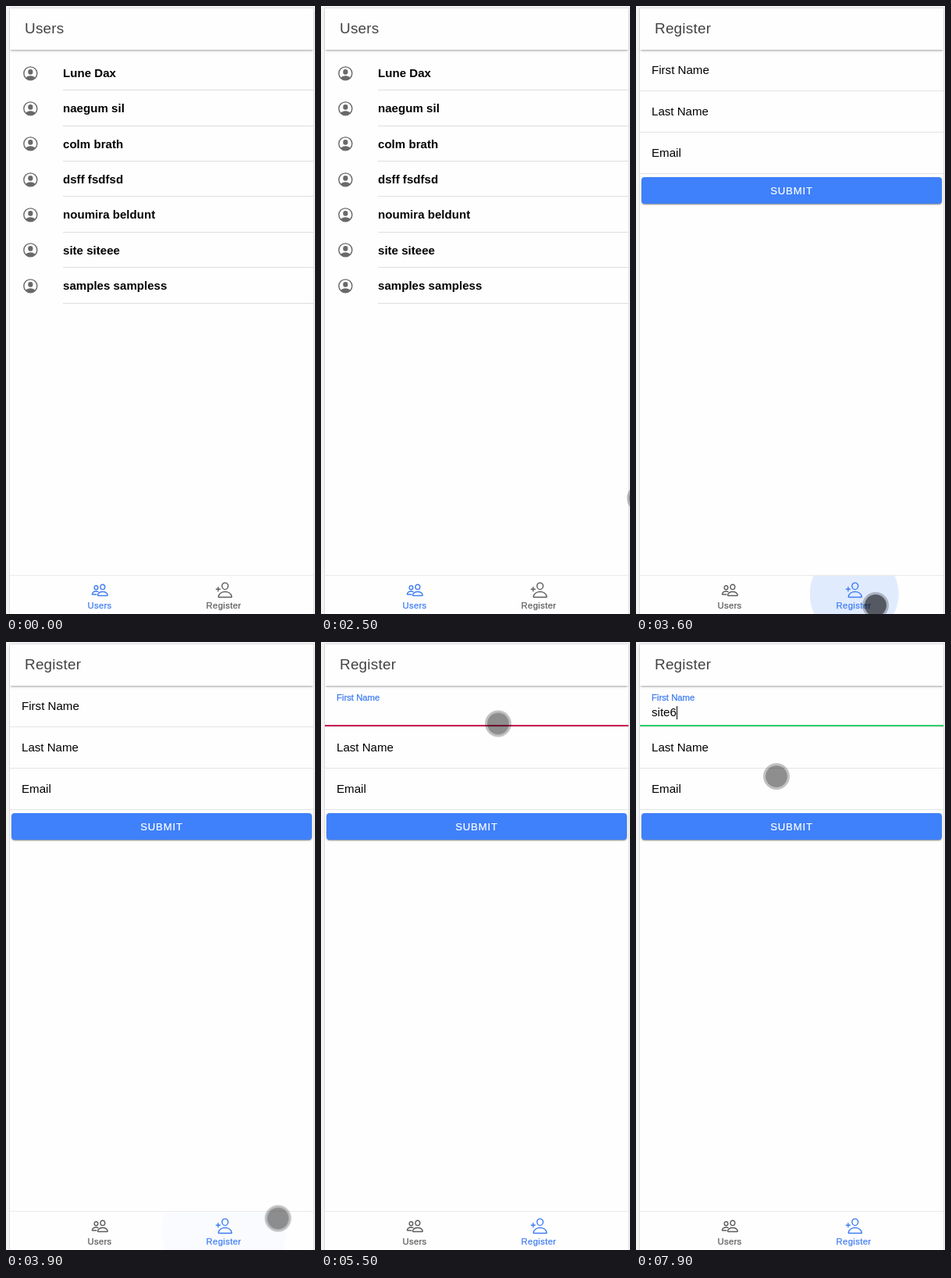
These frames come from a looping animation (396 by 778 pixels, 8000 ms). An HTML page:

```html
<!DOCTYPE html>
<html lang="en">
<head>
<meta charset="utf-8">
<title>Users and Register tabs</title>
<style>
  html, body { margin: 0; width: 100%; height: 100%; overflow: hidden; }
  body {
    --blue: #3f7df2;
    --grey: #5c5c5c;
    position: relative;
    background: #f3f3f3;
    font: 15.1px/20px "Liberation Sans", Arial, sans-serif;
    color: #000;
  }
  body * { box-sizing: border-box; }
  .phone, .page, .mover { position: absolute; }
  .phone {
    left: 0; top: 0; width: 396px; height: 778px; overflow: hidden;
  }
  .screen {
    position: absolute; left: 4px; top: 2px; width: 391px; height: 780px;
    background: #fefefe; border: 1px solid #dedede;
  }
  .page { inset: 0; }
  .header {
    position: absolute; left: 5px; top: 3px; width: 389px; height: 52.5px;
    padding-left: 19px; line-height: 51.5px;
    font-size: 18.9px; letter-spacing: .0125em; color: #424242;
    background: #fefefe;
    box-shadow: 0 2px 2px -1px rgba(0,0,0,.26), 0 3px 3px -1px rgba(0,0,0,.1);
  }
  svg { fill: none; stroke: currentColor; stroke-width: 32; stroke-linecap: round; stroke-linejoin: round; }

  .users { position: absolute; left: 5px; top: 63px; width: 389px; margin: 0; padding: 0; list-style: none; }
  .users li { height: 45.36px; position: relative; font-weight: bold; line-height: 45px; padding-left: 68px; }
  .users li::after { content: ""; position: absolute; left: 68px; right: 0; bottom: 0; height: 1px; background: #dedede; }
  .users svg { position: absolute; left: 15.2px; top: 11.7px; width: 22.7px; height: 22.7px; color: #696969; }

  .field { position: absolute; left: 5px; width: 389px; height: 53px; border-bottom: 1.5px solid #e4e4e4; }
  .label { position: absolute; left: 15px; top: 16.2px; transform-origin: 0 50%; white-space: nowrap; }
  .line { position: absolute; left: 0; right: 0; top: 50.7px; height: 2px; }
  .value { position: absolute; left: 15px; top: 24.8px; white-space: pre; }
  .caret { display: inline-block; width: 1px; height: 17px; background: #000; vertical-align: -4px; }
  .submit {
    position: absolute; left: 7px; top: 218.5px; width: 385px; height: 34px; border-radius: 4px;
    background: #3f80fb; color: #fff; text-align: center; line-height: 35px;
    font-size: 13.2px; letter-spacing: .06em; -webkit-text-stroke: .2px;
    box-shadow: 0 2px 1px -1px rgba(0,0,0,.2), 0 1px 2px rgba(0,0,0,.24), 0 1px 3px rgba(0,0,0,.12);
  }

  .tabs { position: absolute; left: 5px; top: 728px; width: 389px; height: 50px; border-top: 1px solid #ebebeb; }
  .tab {
    position: absolute; top: 0; width: 159px; height: 49px; overflow: hidden; text-align: center;
    font-size: 11.3px; letter-spacing: .03em; color: var(--grey);
  }
  .tab svg { position: absolute; left: 68.4px; top: 7.2px; width: 22.7px; height: 22.7px; }
  .tab span { position: absolute; left: 0; right: 0; top: 28px; -webkit-text-stroke: .25px; }
  .ripple {
    position: absolute; left: 0; top: -56px; width: 159px; height: 159px; border-radius: 50%;
    background: #3880ff; opacity: 0;
  }
  .pointer {
    position: absolute; left: -17px; top: -17px; width: 34px; height: 34px; border-radius: 50%;
    border: 3px solid rgba(0,0,0,.24); background: rgba(0,0,0,.44); background-clip: padding-box;
  }

  /* One 8 s clock: 1% is 80 ms. */
  .users-page { animation: leave 8s step-end infinite; }
  .form-page { animation: enter 8s step-end infinite; }
  .tab-users { animation: deselect 8s step-end infinite; }
  .tab-register { animation: select 8s step-end infinite; }
  .ripple { animation: ripple 8s linear infinite; }
  .first .label { animation: float 8s linear infinite; }
  .first .line { animation: validity 8s step-end infinite; }
  .mover { left: 0; top: 0; animation: move 8s ease-out infinite; }
  .pointer { animation: press 8s step-end infinite; }

  @keyframes leave { 0% { visibility: visible } 45%, 100% { visibility: hidden } }
  @keyframes enter { 0% { visibility: hidden } 45%, 100% { visibility: visible } }
  @keyframes deselect { 0% { color: var(--blue) } 45%, 100% { color: var(--grey) } }
  @keyframes select { 0% { color: var(--grey) } 45%, 100% { color: var(--blue) } }
  @keyframes ripple {
    0%, 44.1% { transform: scale(.5); opacity: 0 }
    44.11% { transform: scale(.5); opacity: .15; animation-timing-function: cubic-bezier(.4,0,.2,1) }
    46.9%, 47.2% { transform: scale(1); opacity: .15 }
    49.1%, 100% { transform: scale(1); opacity: 0 }
  }
  @keyframes float {
    0%, 66.25% { transform: none; color: #000; -webkit-text-stroke-width: 0 }
    68.1%, 100% { transform: translateY(-10.7px) scale(.75); color: var(--blue); -webkit-text-stroke-width: .35px }
  }
  @keyframes validity {
    0% { background: transparent }
    66.25% { background: #c81e50 }
    73.75%, 100% { background: #2fd06f }
  }
  @keyframes move {
    0%, 31% { transform: translate(416px, 620px) }
    37.5% { transform: translate(307px, 766px) }
    38.75%, 47.5% { transform: translate(307px, 767px) }
    52.5% { transform: translate(416px, 690px) }
    52.6%, 60.6% { transform: translate(416px, 60px) }
    66.25%, 81.25% { transform: translate(227px, 104.5px) }
    82.5%, 91.25% { transform: translate(225px, 121px) }
    98.75%, 100% { transform: translate(180px, 172px) }
  }
  @keyframes press {
    0%, 46.25%, 67.5%, 100% { background-color: rgba(0,0,0,.44) }
    43.75%, 66.25% { background-color: rgba(0,0,0,.62) }
  }
</style>
</head>
<body>
<svg width="0" height="0" style="position:absolute">
  <symbol id="account" viewBox="0 0 512 512">
    <circle cx="256" cy="256" r="192"/>
    <g fill="currentColor" stroke="none">
      <ellipse cx="256" cy="212" rx="70" ry="74"/>
      <path d="M120 382C165 300 347 300 392 382C340 465 172 465 120 382z"/>
    </g>
  </symbol>
  <symbol id="people" viewBox="0 0 512 512">
    <path d="M402 168c-3 41-33 72-66 72s-63-31-66-72c-3-42 26-72 66-72s69 30 66 72z"/>
    <path d="M336 304c-65 0-128 32-144 95-2 9 4 17 12 17h264c8 0 14-8 12-17-16-64-79-95-144-95z"/>
    <path d="M200 186c-2 32-27 58-53 58s-51-26-53-58c-2-34 21-58 53-58s55 25 53 58z"/>
    <path d="M206 306c-18-8-38-11-59-11-52 0-102 26-115 76-1 6 3 13 10 13h112"/>
  </symbol>
  <symbol id="add" viewBox="0 0 512 512">
    <path d="M376 144c-4 53-44 96-88 96s-84-43-88-96c-4-55 35-96 88-96s92 42 88 96z"/>
    <path d="M288 304c-87 0-175 48-192 139-2 11 5 21 16 21h352c11 0 18-10 16-21-17-91-105-139-192-139zM88 176v112M144 232H32"/>
  </symbol>
</svg>

<div class="phone">
  <div class="screen"></div>

  <div class="page users-page">
    <ul class="users" id="users"></ul>
    <div class="header">Users</div>
  </div>

  <div class="page form-page">
    <div class="field first" style="top:55.5px">
      <div class="label">First Name</div>
      <div class="value"><span id="typed"></span><i class="caret" id="caret"></i></div>
      <div class="line"></div>
    </div>
    <div class="field" style="top:108.5px"><div class="label">Last Name</div></div>
    <div class="field" style="top:161.5px"><div class="label">Email</div></div>
    <div class="submit">SUBMIT</div>
    <div class="header">Register</div>
  </div>

  <div class="tabs">
    <div class="tab tab-users" style="left:35.5px">
      <svg><use href="#people"/></svg><span>Users</span>
    </div>
    <div class="tab tab-register" style="left:194.5px">
      <div class="ripple"></div>
      <svg><use href="#add"/></svg><span>Register</span>
    </div>
  </div>

  <div class="mover" id="mover"><div class="pointer"></div></div>
</div>

<script>
  const byId = id => document.getElementById(id);
  const names = ["Lune Dax", "naegum sil", "colm brath", "dsff fsdfsd",
                 "noumira beldunt", "site siteee", "samples sampless"];
  byId("users").innerHTML = names
    .map(name => `<li><svg><use href="#account"/></svg>${name}</li>`).join("");

  const entry = "site6";
  const keyTimes = [5900, 6300, 6600, 6700, 6850];
  const typed = byId("typed"), caret = byId("caret");
  const clock = byId("mover").getAnimations()[0];

  function draw() {
    const time = (clock.currentTime || 0) % 8000;
    const count = keyTimes.filter(key => key <= time).length;
    const sinceKey = time - keyTimes[count - 1];
    typed.textContent = entry.slice(0, count);
    // The caret blinks every half second, counted from the last key.
    caret.style.opacity = count && sinceKey % 1000 < 500 ? 1 : 0;
    requestAnimationFrame(draw);
  }
  draw();
</script>
</body>
</html>
```
